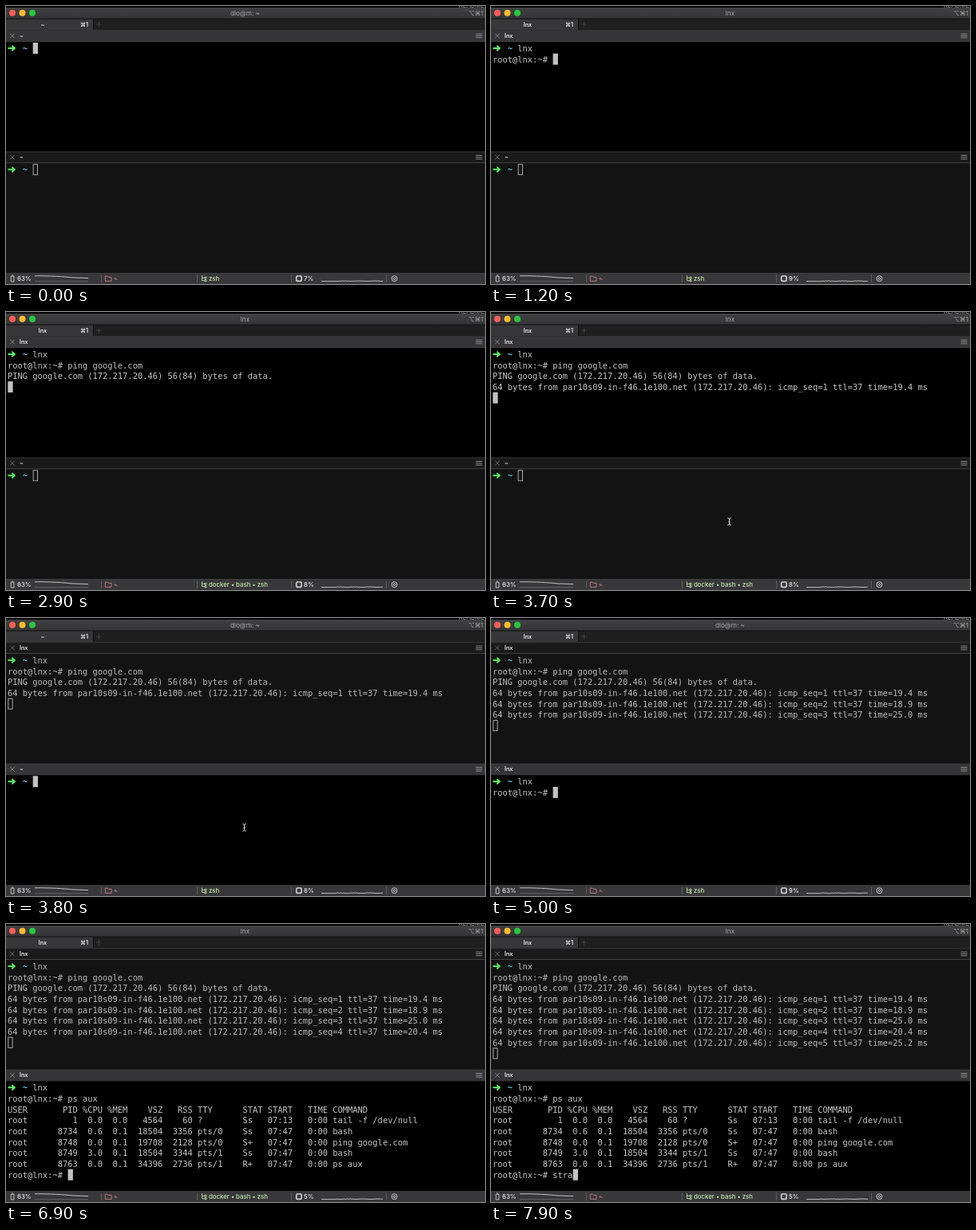
Animation of 600 by 349 pixels, one loop 8 s. Source, as an HTML page:

```html
<!DOCTYPE html>
<html lang="en">
<head>
<meta charset="utf-8">
<title>Two terminal panes</title>
<style>
  html, body { margin: 0; width: 100%; height: 100%; overflow: hidden; background: #000; }
  svg { display: block; width: 100vw; height: 100vh; }
  text { white-space: pre; font: 500 7.8px Inter, "DejaVu Sans", sans-serif; fill: #ececec; }
  .mono text { font: 10.42px "DejaVu Sans Mono", monospace; fill: #c7c7c7; }
  .mono .tilde { font-weight: bold; fill: #5fd7ee; }
  .small { font-size: 7.2px; font-weight: 600; }
  .muted { fill: #a4a4a5; font-weight: 400; }
  .line { fill: none; stroke: #d2d2d2; stroke-width: .9; }
</style>
</head>
<body>
<svg id="stage" viewBox="0 0 600 349" preserveAspectRatio="none">
  <defs>
    <linearGradient id="chrome" x2="0" y2="1">
      <stop stop-color="#414143"/><stop offset="1" stop-color="#343436"/>
    </linearGradient>
  </defs>
  <rect width="600" height="349"/>
  <text x="567" y="2" class="muted">README</text>
  <rect y="2" width="600" height="14" fill="url(#chrome)"/>
  <circle cx="8" cy="8.8" r="4" fill="#ff5f57"/>
  <circle cx="20.5" cy="8.8" r="4" fill="#febc2e"/>
  <circle cx="33" cy="8.8" r="4" fill="#28c840"/>
  <text id="title" x="299.5" y="11.8" text-anchor="middle" class="muted" style="font-size:8.2px"></text>
  <text x="598" y="11.8" text-anchor="end" class="muted">⌥⌘1</text>

  <rect y="16" width="600" height="14.5" fill="#1f1f20"/>
  <rect y="16" width="109" height="14.5" fill="#373739"/>
  <path d="M109.5 16V30.5M0 16H600M0 30.5H600" stroke="#101011" fill="none"/>
  <text id="tab" x="46" y="26" text-anchor="middle" class="small"></text>
  <text x="103" y="26" text-anchor="end" class="small">⌘1</text>
  <path d="M113 23H120M116.5 19.5V26.5" stroke="#48484a" stroke-width=".8"/>

  <g id="panes"></g>
  <g id="pointer" fill="none" stroke-width="1">
    <path d="M296.3 258.5Q298.5 258.5 298.5 260.5Q298.5 258.5 300.7 258.5M298.5 260V266M296.3 267.5Q298.5 267.5 298.5 265.5Q298.5 267.5 300.7 267.5M297.3 263.5H299.7" stroke="#d8d8d8"/>
  </g>

  <rect y="335.5" width="600" height="13.5" fill="#38383a"/>
  <path d="M0 335.5H600" stroke="#4a4a4b" stroke-width=".6"/>
  <path d="M119.5 337.5V347M239.5 337.5V347M357.5 337.5V347M476.5 337.5V347" stroke="#69696a" stroke-width=".8"/>
  <path class="line" d="M6.2 339.2H10V346H6.2ZM7.2 338H9"/>
  <text x="14" y="345">63%</text>
  <path class="line" d="M36 338.8C55 338.6 72 339.6 84 341L103 341.6"/>
  <path d="M36 345.7H103" stroke="#77777a" stroke-width=".7"/>
  <path class="line" style="stroke:#c9807f" d="M124.3 345.4V339.2H127L128 340.3H132V345.4Z"/>
  <text x="135" y="345" style="fill:#d58a88">~</text>
  <path class="line" style="stroke:#b9dda0" d="M245.5 338.3V344.7H249M245.5 341.3H249M249 340.3H251V342.3H249ZM249 343.7H251V345.7H249Z"/>
  <text id="job" x="254" y="345" style="fill:#c6e8b0"></text>
  <rect class="line" x="363.7" y="339" width="6.4" height="6.4" rx="1.2" style="stroke-width:1.6"/>
  <text id="cpu" x="373" y="345"></text>
  <path id="load" class="line"/>
  <circle class="line" cx="486.5" cy="342.2" r="3.5"/>
  <circle class="line" cx="486.5" cy="342.2" r="1.4"/>
</svg>
<script>
const LOOP = 8000, CELL = 6.273, ROW = 13.68;
const $ = id => document.getElementById(id);

function add(parent, tag, attrs = {}, text = "") {
  const node = document.createElementNS("http://www.w3.org/2000/svg", tag);
  for (const key in attrs) node.setAttribute(key, attrs[key]);
  node.textContent = text;
  return parent.appendChild(node);
}

// One keystroke per listed time.
const keys = (text, ...times) => times.map((time, i) => [time, text[i]]);
const reply = (seq, ms) => [seq * 1000 + 2000,
  `64 bytes from par10s09-in-f46.1e100.net (172.217.20.46): icmp_seq=${seq} ttl=37 time=${ms} ms\n`];
const SHELL = "root@lnx:~# ";
const TABLE = `
USER       PID %CPU %MEM    VSZ   RSS TTY      STAT START   TIME COMMAND
root         1  0.0  0.0   4564    60 ?        Ss   07:13   0:00 tail -f /dev/null
root      8734  0.6  0.1  18504  3356 pts/0    Ss   07:47   0:00 bash
root      8748  0.0  0.1  19708  2128 pts/0    S+   07:47   0:00 ping google.com
root      8749  3.0  0.1  18504  3344 pts/1    Ss   07:47   0:00 bash
root      8763  0.0  0.1  34396  2736 pts/1    R+   07:47   0:00 ps aux
`;

// Output is appended in order of time.
const upperLog = [
  ...keys("lnx\n", 100, 200, 400, 600),
  [1000, SHELL],
  ...keys("ping google.", 1400, 1500, 1600, 1700, 1800, 2000, 2100, 2200, 2300, 2400, 2500, 2500),
  ...keys("com\n", 2600, 2700, 2700, 2800),
  [2900, "PING google.com (172.217.20.46) 56(84) bytes of data.\n"],
  reply(1, "19.4"), reply(2, "18.9"), reply(3, "25.0"), reply(4, "20.4"), reply(5, "25.2")
];
const lowerLog = [
  ...keys("lnx\n", 4100, 4200, 4300, 4500),
  [4900, SHELL],
  ...keys("ps aux", 5200, 5300, 5400, 5500, 5600, 5700),
  [5800, TABLE + SHELL],
  ...keys("stra", 7500, 7700, 7800, 7900)
];

const JOBS = "docker • bash • zsh";
const titles = [[0, "dlo@m: ~"], [1200, "lnx"], [3800, "dlo@m: ~"], [5200, "lnx"]];
const jobs = [[0, "zsh"], [1300, JOBS], [3800, "zsh"], [5200, JOBS]];
const cpu = [[0, 7], [900, 9], [2900, 8], [4900, 9], [6900, 5]];
const at = (steps, t) => steps.filter(([time]) => time <= t).pop()[1];

function makePane(top, height, log, renamed) {
  const g = add($("panes"), "g");
  const back = add(g, "rect", { y: top, width: 600, height });
  const bar = add(g, "rect", { y: top, width: 600, height: 13.5 });
  add(g, "path", { d: `M0 ${top + 13.8}H600`, stroke: "#4d4d4f", "stroke-width": .8 });
  add(g, "path", { d: `M0 ${top}H600`, stroke: "#48484a", "stroke-width": .7 });
  const cross = add(g, "path", { d: `M5.2 ${top + 4}l5.4 5.6m0-5.6l-5.4 5.6`, "stroke-width": .9 });
  const name = add(g, "text", { x: 17, y: top + 9.4, class: "small" });
  add(g, "path", { d: `M588.5 ${top + 4.5}h8m-8 2.3h8m-8 2.3h8`, stroke: "#98989a", "stroke-width": .9 });

  const mono = add(g, "g", { class: "mono" }), first = top + 22.3;
  const y = row => first + row * ROW;
  const baseline = row => y(row) + 4;
  add(mono, "path", { d: `M2.5 ${first}H10M7.3 ${first - 3.2}L10.8 ${first}L7.3 ${first + 3.2}`,
    fill: "none", stroke: "#5ff967", "stroke-width": 1.9 });
  add(mono, "text", { x: 2 + 3 * CELL, y: baseline(0), class: "tilde" }, "~");
  const rows = Array.from({ length: 9 }, (_, i) => add(mono, "text", { x: 2, y: baseline(i) }));
  const cursor = add(mono, "rect");

  return (t, active) => {
    const output = log.filter(([time]) => time <= t).map(([, text]) => text).join("");
    const lines = ("     " + output).split("\n");
    rows.forEach((row, i) => row.textContent = lines[i] || "");
    const inset = active ? 0 : .5, last = lines.length - 1;
    const box = {
      x: 2.3 + lines[last].length * CELL + inset, y: y(last) - 7 + inset,
      width: 6.3 - 2 * inset, height: 14 - 2 * inset,
      fill: active ? "#c2c2c2" : "none", stroke: active ? "none" : "#b5b5b5"
    };
    for (const key in box) cursor.setAttribute(key, box[key]);
    back.setAttribute("fill", active ? "#000" : "#131313");
    bar.setAttribute("fill", active ? "#353537" : "#1a1a1b");
    cross.setAttribute("stroke", active ? "#8a8a8c" : "#6c6c6e");
    mono.setAttribute("opacity", active ? 1 : .93);
    return name.textContent = t >= renamed ? "lnx" : "~";
  };
}

const upper = makePane(30.7, 152, upperLog, 700);
const lower = makePane(183, 153, lowerLog, 4600);

function loadPath(shift) {
  let d = "M395 345.6";
  for (let i = 1; i <= 38; i++) {
    const n = i + shift, wave = Math.sin(n * 12.9) * Math.sin(n * 4.7);
    d += `L${395 + i * 2.03} ${(345.6 - (i > 8 ? Math.abs(wave) * .7 : 0)).toFixed(2)}`;
  }
  return d;
}

function draw(t) {
  const lowerActive = t >= 3800;
  const upperName = upper(t, !lowerActive), lowerName = lower(t, lowerActive);
  $("tab").textContent = lowerActive ? lowerName : upperName;
  $("title").textContent = at(titles, t);
  $("job").textContent = at(jobs, t);
  $("cpu").textContent = at(cpu, t) + "%";
  $("load").setAttribute("d", loadPath(Math.floor((t + 100) / 1000)));
  $("pointer").setAttribute("visibility", t >= 3300 && t < 4100 ? "visible" : "hidden");
}

const start = performance.now();
let shown = -1;
function tick(now) {
  // All changes fall on tenths of a second.
  const step = Math.floor((Math.max(0, now - start) % LOOP + 10) / 100) * 100 % LOOP;
  if (step !== shown) draw(shown = step);
  requestAnimationFrame(tick);
}
tick(start);
</script>
</body>
</html>
```
